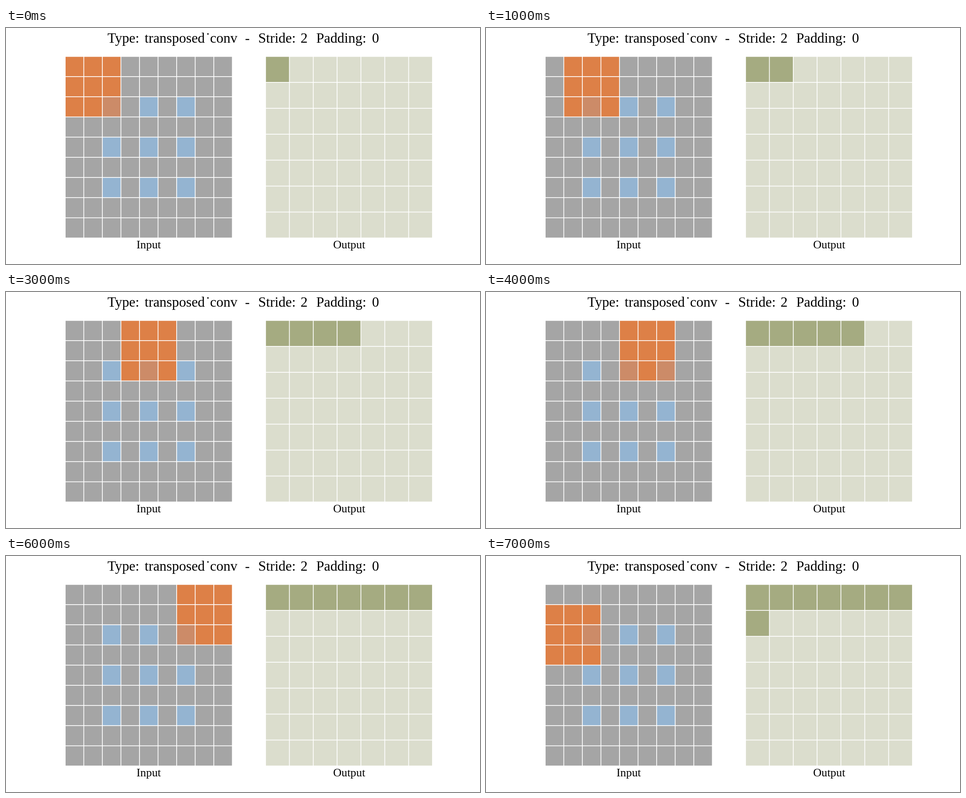
Recreate the animation shown at these times as an HTML page. Size 1058 by 529 pixels, loop 8000 ms.

```html
<!DOCTYPE html>
<html lang="en">
<head>
<meta charset="utf-8">
<title>Transposed convolution</title>
<style>
  html, body { margin: 0; width: 100%; height: 100%; overflow: hidden; background: #fff; }
  svg { display: block; width: 100%; height: 100%; }
  text { font-family: "Liberation Serif", "Times New Roman", serif; fill: #000; }
  .title { font-size: 31.4px; }
  .label { font-size: 25.8px; text-anchor: middle; }
</style>
</head>
<body>
<svg viewBox="0 0 1058 529">
  <text class="title" y="32.5">
    <tspan x="226.5">Type:</tspan>
    <tspan x="309.5">transposed</tspan><tspan x="445.5">˙</tspan><tspan x="455.5">conv</tspan>
    <tspan x="533.5">-</tspan>
    <tspan x="563">Stride:</tspan> <tspan x="657.5">2</tspan>
    <tspan x="692.5">Padding:</tspan> <tspan x="817">0</tspan>
  </text>
  <g id="cells"></g>
  <text class="label" x="318.5" y="494">Input</text>
  <text class="label" x="766" y="494">Output</text>
</svg>
<script>
const STEP = 1000, STEPS = 8, KERNEL = 3, IN = 9, OUT = 7;
const GAP = 1.7, TOP = 64.6, HEIGHT = 406.9;
const color = {
  empty: "#a5a5a5", data: "#94b4d1", kernel: "#dd8047", overlap: "#cc8b68",
  done: "#a5ab81", pending: "#dbddcd"
};
const layer = document.getElementById("cells");

function makeGrid(n, left, pitchX) {
  const pitchY = HEIGHT / n;
  return Array.from({ length: n * n }, (_, i) => {
    const cell = document.createElementNS("http://www.w3.org/2000/svg", "rect");
    cell.setAttribute("x", left + (i % n) * pitchX);
    cell.setAttribute("y", TOP + Math.floor(i / n) * pitchY);
    cell.setAttribute("width", pitchX - GAP);
    cell.setAttribute("height", pitchY - GAP);
    layer.append(cell);
    return cell;
  });
}

const input = makeGrid(IN, 133, 41.45);
const output = makeGrid(OUT, 580.2, 53.22);

// Data cells sit at every second place, spread by the stride.
const isData = k => k >= 2 && k <= 6 && k % 2 === 0;
const inside = (k, start) => k >= start && k < start + KERNEL;

function draw(step) {
  const kx = step % OUT, ky = Math.floor(step / OUT);
  input.forEach((cell, i) => {
    const x = i % IN, y = Math.floor(i / IN);
    const data = isData(x) && isData(y);
    const covered = inside(x, kx) && inside(y, ky);
    const kind = covered ? (data ? "overlap" : "kernel") : (data ? "data" : "empty");
    cell.setAttribute("fill", color[kind]);
  });
  output.forEach((cell, i) => cell.setAttribute("fill", i <= step ? color.done : color.pending));
}

const start = performance.now();
let shown = -1;
function tick() {
  const step = Math.floor((performance.now() - start) / STEP) % STEPS;
  if (step !== shown) draw(shown = step);
  requestAnimationFrame(tick);
}
tick();
</script>
</body>
</html>
```
